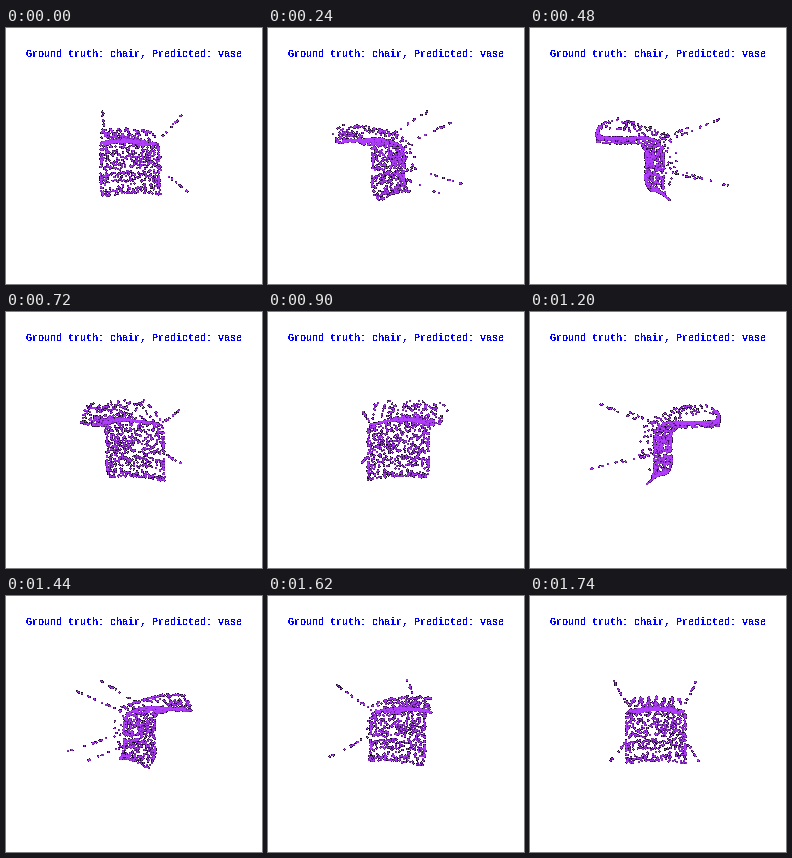
Recreate the animation shown at these times as a matplotlib script. Size 256x256 px, loop 1.8 s.

```python
import numpy as np
import matplotlib.pyplot as plt
from matplotlib.animation import FuncAnimation

SIZE, FRAMES, INTERVAL = 256, 30, 60
CAMERA = 221.7          # camera distance, in pixels at the centre depth
RADIUS = 1.28           # dot radius in pixels
PURPLE = np.array([0.7, 0.24, 1.0])
MID = -2                # x of the chair's plane of symmetry

rng = np.random.default_rng(7)


def path(t, knots):
    """Points (z, y) at t in 0..1 along a polyline, by arc length."""
    z, y = np.array(knots, float).T
    s = np.r_[0, np.cumsum(np.hypot(np.diff(z), np.diff(y)))]
    return np.interp(t * s[-1], s, z), np.interp(t * s[-1], s, y)


def sheet(n, knots, w0, w1, bow, edge=0.0):
    """Random dots on a profile swept across x; bow drops the sides."""
    t = rng.random(n)
    u = rng.uniform(-1, 1, n)
    side = rng.random(n) < edge
    u[side] = np.sign(u[side]) * rng.uniform(0.93, 1, side.sum())
    z, y = path(t, knots)
    return np.c_[MID + u * (w0 + (w1 - w0) * t), y - bow * u**2, z]


def ribs(count, n, knots, half):
    """Sparse dotted strips on the back of the shell."""
    parts = []
    for u in np.linspace(-1, 1, count):
        z, y = path(np.sort(rng.random(n)), knots)
        x = MID + u * half + rng.normal(0, 0.7, n)
        parts.append(np.c_[x, y - 2 * u**2 + rng.normal(0, 0.6, n), z])
    return np.vstack(parts)


def leg(root, tip, n=13):
    t = np.r_[rng.random(n - 1), 1][:, None]
    dots = np.array(root) + (np.array(tip) - np.array(root)) * t
    return dots + rng.normal(0, 0.4, dots.shape)


def build_chair():
    back = [(-58, 18), (-50, 17), (-35, 17), (-16, 18)]
    lip = [(-57, 27), (-59, 23), (-57, 18)]
    bend = [(-16, 18), (-10, 16), (-6, 10)]
    seat = [(-6, 10), (-5, -8), (-6, -24), (-4, -31)]
    front = [(-4, -31), (-1, -35), (2, -37)]
    shell = [(-58, 24), (-53, 29), (-44, 32), (-25, 29), (0, 20),
             (6, 14), (9, 2), (5, -14), (0, -26)]
    parts = [
        sheet(290, back, 23, 30, 4, 0.1),
        sheet(60, lip, 20, 23, 3),
        sheet(90, bend, 30, 31, 4),
        sheet(380, seat, 31, 31, 1, 0.16),
        sheet(85, front, 31, 30, 2.5),
        ribs(7, 20, shell, 26),
    ]
    for x0, x1 in ((-28, -35), (25, 30)):
        parts.append(leg((x0, 17, 8), (x1, 33.5, 47)))
        parts.append(leg((x0, -13, 8), (x1, -27.5, 57)))
    return np.vstack(parts)


CHAIR = build_chair()


def project(angle):
    x, y, z = CHAIR.T
    c, s = np.cos(angle), np.sin(angle)
    scale = CAMERA / (CAMERA + x * s - z * c)
    return SIZE / 2 + (x * c + z * s) * scale, SIZE / 2 - y * scale


def render(i):
    """Soft dots blended over black, on white where no dot falls."""
    px, py = project(2 * np.pi * (i + 1) / FRAMES)
    clear = np.ones((SIZE, SIZE))
    for dx in range(-2, 3):
        for dy in range(-2, 3):
            col = np.floor(px).astype(int) + dx
            row = np.floor(py).astype(int) + dy
            d2 = (col + 0.5 - px) ** 2 + (row + 0.5 - py) ** 2
            hit = d2 < RADIUS**2
            np.multiply.at(clear, (row[hit], col[hit]), d2[hit] / RADIUS**2)
    image = (1 - clear)[..., None] * PURPLE
    image[clear == 1] = 1
    return image


plt.rcParams["text.antialiased"] = False
fig = plt.figure(figsize=(4, 4), dpi=64, facecolor="white")
ax = fig.add_axes([0, 0, 1, 1])
ax.axis("off")
picture = ax.imshow(render(0), extent=(0, SIZE, SIZE, 0),
                    interpolation="nearest")
ax.text(20, 29, "Ground truth: chair, Predicted: vase", color="#0000ff",
        family="Liberation Mono", weight="bold", size=10 * 72 / 64,
        va="baseline", ha="left")


def update(i):
    picture.set_data(render(i))
    return [picture]


anim = FuncAnimation(fig, update, frames=FRAMES, interval=INTERVAL,
                     repeat=True, repeat_delay=0)
plt.show()
```
